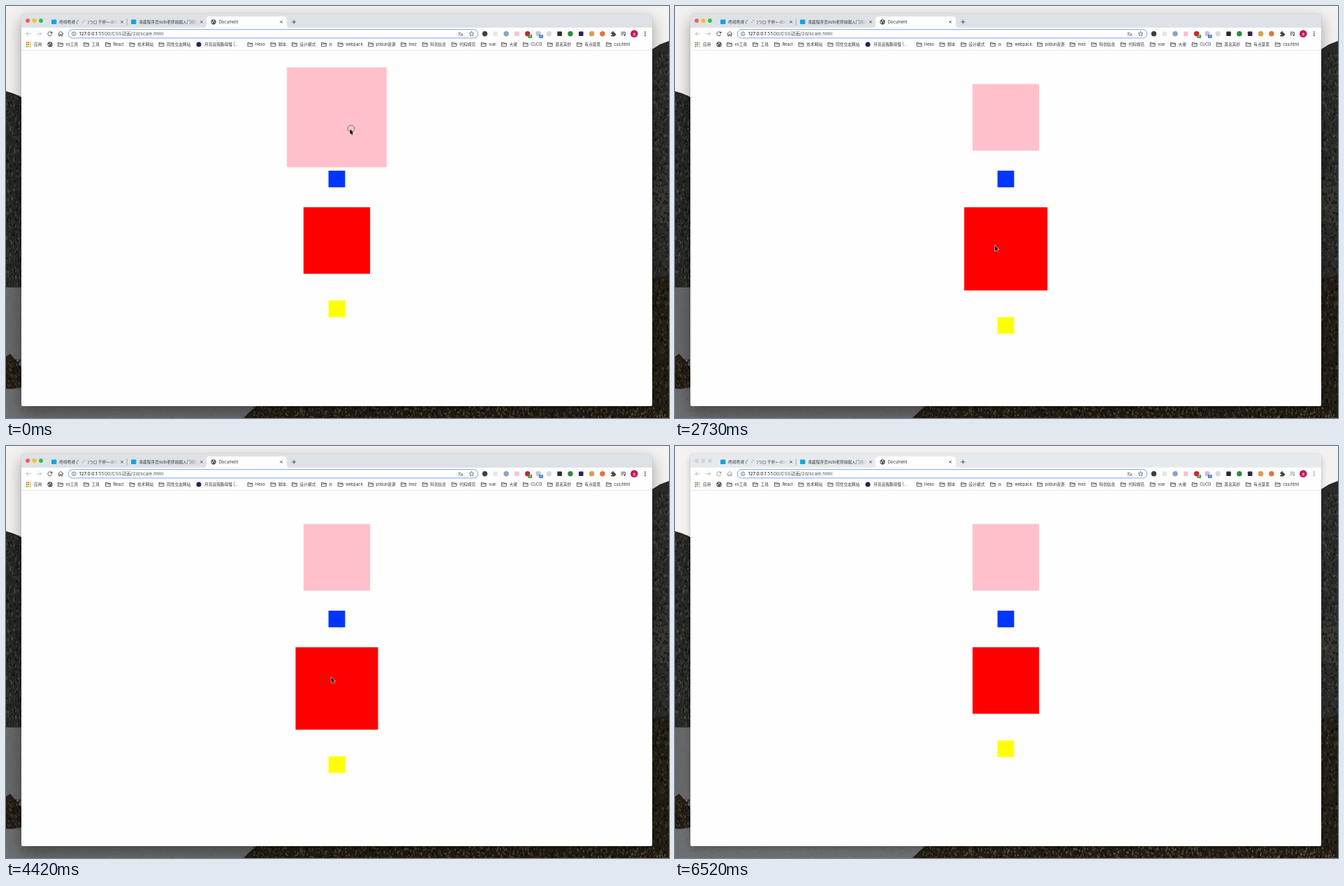
Write an HTML page with a canvas that moves like this. It is 949 px wide and 590 px high and loops after 6620 ms.

```html
<!DOCTYPE html>
<html lang="zh">
<head>
<meta charset="utf-8">
<title>Scale</title>
<style>
  html, body { margin: 0; width: 100%; height: 100%; overflow: hidden; background: #efedeb; }
  canvas, svg, .win { position: absolute; left: 0; top: 0; }
  .win {
    left: 22px; top: 11px; width: 903px; height: 562px;
    border-radius: 5px 5px 2px 2px; background: #fefefe;
    animation: shadow 6.62s step-end infinite;
  }
  text { font-family: Inter, "Noto Sans CJK SC", "Noto Sans CJK", sans-serif; font-size: 5.72px; fill: #2f3236; }
  .line { fill: none; stroke: #44474b; stroke-width: .9; }
  .strip, .light, .dim, .ring { animation: 6.62s step-end infinite; }
  .strip { fill: #dee1e6; animation-name: strip; }
  .light { animation-name: light; }
  .dim { animation-name: dim; }
  .ring { fill: none; stroke: #4a4044; stroke-width: .7; animation-name: ring; }
  .zoom, .grow, .push { animation: 6.62s ease infinite; transform-box: fill-box; }
  .zoom { transform-origin: center; animation-name: zoom; }
  .grow { transform-origin: top; animation-name: grow; }
  .push { animation-name: push; }
  .cursor { animation: move 6.62s linear infinite; }

  @keyframes shadow {
    0% { box-shadow: 0 0 1px rgba(0,0,0,.4), 0 9px 22px rgba(0,0,0,.36); }
    98.49%, to { box-shadow: 0 0 1px rgba(0,0,0,.3), 0 4px 9px rgba(0,0,0,.22); }
  }
  @keyframes strip { 98.49%, to { fill: #e7eaed; } }
  @keyframes light { 98.49%, to { fill: #d0d3d7; } }
  @keyframes dim { 98.49%, to { opacity: .55; } }
  @keyframes ring { 0% { opacity: 1; } 1.36%, to { opacity: 0; } }
  @keyframes zoom {
    0%, 7.55% { transform: scale(1.5); }
    22.66%, to { transform: scale(1); }
  }
  @keyframes grow {
    0%, 22.81% { transform: scale(1); }
    37.92% { transform: scale(1.25); }
    43.43% { transform: scale(1.25); animation-timing-function: cubic-bezier(.277,.093,.299,.873); }
    55.97% { transform: scale(1.0043); }
    70.77%, 71.83% { transform: scale(1.25); }
    86.93%, to { transform: scale(1); }
  }
  @keyframes push {
    0%, 22.81% { transform: translateY(0); }
    37.92% { transform: translateY(23.8px); }
    43.43% { transform: translateY(23.8px); animation-timing-function: cubic-bezier(.277,.093,.299,.873); }
    55.97% { transform: translateY(.4px); }
    70.77%, 71.83% { transform: translateY(23.8px); }
    86.93%, to { transform: translateY(0); }
  }
  @keyframes move {
    0%, 5.3% { transform: translate(492.4px,176.3px); }
    7.55% { transform: translate(503px,231px); }
    11% { transform: translate(518px,264px); }
    15.71% { transform: translate(525.1px,277.6px); }
    17.8% { transform: translate(528px,281px); }
    22.81% { transform: translate(516px,288.5px); }
    26.13% { transform: translate(491.4px,319px); }
    31% { transform: translate(468px,340px); }
    37%, 41.24% { transform: translate(457.4px,343px); }
    43.43% { transform: translate(533px,345px); }
    47.28% { transform: translate(640px,349px); }
    49% { transform: translate(643.5px,350px); }
    52.1% { transform: translate(615px,344px); }
    55.97% { transform: translate(521.5px,335px); }
    59.67% { transform: translate(466.6px,326.6px); }
    64% { transform: translate(459px,329px); }
    68.58% { transform: translate(470px,333px); }
    71.83% { transform: translate(533px,350px); }
    75.68% { transform: translate(688.3px,393.6px); }
    79.15% { transform: translate(874px,503px); }
    83% { transform: translate(915px,556px); }
    86.4%, to { transform: translate(923px,593px); }
  }
</style>
</head>
<body>
<canvas id="wall" width="949" height="590"></canvas>
<div class="win"></div>
<svg width="949" height="590" viewBox="0 0 949 590">
  <defs>
    <linearGradient id="fade" gradientUnits="userSpaceOnUse" x1="70" x2="84">
      <stop stop-color="#34373b"/><stop offset="1" stop-color="#34373b" stop-opacity="0"/>
    </linearGradient>
    <g id="folder" fill="none" stroke="#4f5357" stroke-width=".9">
      <path d="M.5 -2.6H3.1L4 -1.7H7.4V2.8H.5ZM.5 -.6H7.4"/>
    </g>
    <g id="globe">
      <circle r="3.6" fill="#44474b"/>
      <path d="M-2.6 -1L-.8 .2L-1 2.4L-2.4 1.2ZM-.4 -2.6L1.6 -2L.6 -.4L-.8 -.8ZM1 .6L2.6 .2L1.6 2.2Z" fill="#fff"/>
    </g>
    <path id="x" class="line" d="M-1.7 -1.7L1.7 1.7M1.7 -1.7L-1.7 1.7"/>
  </defs>

  <path class="strip" d="M22 31V16Q22 11 27 11H920Q925 11 925 16V31Z"/>
  <circle class="light" cx="31" cy="21" r="2.9" fill="#ff5850"/>
  <circle class="light" cx="40.5" cy="21" r="2.9" fill="#fdb924"/>
  <circle class="light" cx="50" cy="21" r="2.9" fill="#28c33c"/>
  <path d="M283 31Q287 31 287 27V19Q287 15 291 15H398Q402 15 402 19V27Q402 31 406 31Z" fill="#fefefe"/>

  <rect x="65" y="19.5" width="7.4" height="6.6" rx="1" fill="#14a4d8"/>
  <g transform="translate(76.3 24.9)"><text style="fill:url(#fade)">咚呀咚呀 (゜-゜)つロ 干杯~-dong</text></g>
  <use href="#x" x="166" y="22.8"/>
  <path class="line" d="M173.3 18V27.5" style="stroke:#8b8f94;stroke-width:.6"/>
  <rect x="179" y="19.5" width="7.4" height="6.6" rx="1" fill="#14a4d8"/>
  <g transform="translate(190.4 24.9)"><text style="fill:url(#fade)">青鹿程序员sulo老师前端入门视频</text></g>
  <use href="#x" x="280" y="22.8"/>
  <use href="#globe" x="297" y="22.8"/>
  <text x="304.7" y="24.9">Document</text>
  <use href="#x" x="394" y="22.8"/>
  <path class="line" d="M409.2 22.8H415.2M412.2 19.8V25.8"/>

  <path class="line" d="M35.7 39.8H29.2M32.2 36.7L29.1 39.8L32.2 42.9M44 39.8H50.5M47.5 36.7L50.6 39.8L47.5 42.9" style="stroke:#b4b6b9"/>
  <g class="dim">
    <path class="line" d="M65.3 38A3 3 0 1 0 65.8 40.6"/>
    <path d="M66.3 36.2V39.3H63.2Z" fill="#44474b"/>
    <path class="line" d="M74.5 40L78.3 36.4L82.1 40M75.7 39.2V43H77.4V40.6H79.2V43H80.9V39.2"/>
    <path class="line" d="M880.3 37.5H886.3M880.3 39.5H885M880.3 41.5H883M886.3 37.5V41.8"/>
    <circle cx="885.4" cy="41.9" r="1.1" fill="#44474b"/>
    <circle cx="914.8" cy="37.2" r=".8"/><circle cx="914.8" cy="39.8" r=".8"/><circle cx="914.8" cy="42.4" r=".8"/>
  </g>
  <rect x="89.3" y="33.7" width="586.4" height="12.2" rx="6.1" fill="#fff" stroke="#7fa2ec" stroke-width="1"/>
  <circle class="line" cx="97.3" cy="39.8" r="2.8" style="stroke-width:.7"/>
  <path class="line" d="M97.3 39.3V41.4M97.3 38V38.7" style="stroke-width:.8"/>
  <text x="104.7" y="42.1" style="font-size:6.82px;fill:#4d5155"><tspan fill="#15171a">127.0.0.1</tspan>:5500/CSS动画/2d/scale.html</text>
  <text x="647" y="40.8" style="font-size:4.6px">文</text>
  <text x="650.9" y="43.2" style="font-size:5px">A</text>
  <path class="line" d="M666.5 36.4L667.5 38.7L669.9 38.9L668 40.5L668.6 42.9L666.5 41.6L664.4 42.9L665 40.5L663.1 38.9L665.5 38.7Z" style="stroke-width:.7"/>
  <g id="tools"></g>
  <rect x="747.3" y="40.9" width="5.6" height="5" rx="1" fill="#3d9445"/>
  <rect x="763" y="40.9" width="5.6" height="5" rx="1" fill="#3f73d8"/>
  <text x="748.8" y="45" style="font-size:4.4px;fill:#fff">2</text>
  <text x="764.4" y="45" style="font-size:4.4px;fill:#fff">6</text>
  <path d="M866 38H867.6A1.3 1.3 0 1 1 870 38H871.6V39.5A1.3 1.3 0 1 1 871.6 42V43.4H866V41.8A1.2 1.2 0 1 0 866 39.5Z" fill="#45484c"/>
  <circle cx="899.2" cy="39.8" r="5.3" fill="#c2185b"/>
  <text x="899.2" y="41.5" text-anchor="middle" style="font-size:4.6px;fill:#fff">木</text>

  <g id="marks"></g>
  <text x="40" y="57">应用</text>
  <use href="#globe" x="63" y="54.9"/>
  <circle cx="276" cy="54.9" r="3.5" fill="#27264f"/>
  <text x="284" y="57">月亮说我跑得慢 |…</text>
  <path d="M22 63.6H925" stroke="#dfe1e4" stroke-width=".8"/>

  <rect class="zoom" x="425.85" y="111.75" width="95.3" height="95.3" fill="#ffc0cb"/>
  <rect x="461.6" y="235.8" width="23.8" height="23.8" fill="#0035ff"/>
  <rect class="grow" x="425.85" y="288.2" width="95.3" height="95.3" fill="#f00"/>
  <rect class="push" x="461.6" y="421.7" width="23.8" height="23.8" fill="#ff0"/>

  <circle class="ring" cx="494" cy="175.6" r="4.8"/>
  <path class="cursor" d="M0 0V7.4L1.7 5.9L2.8 8.4L4.1 7.9L3 5.3H5.2Z" fill="#000" stroke="#fff" stroke-width="1.1" paint-order="stroke"/>
</svg>
<script>
  const NS = 'http://www.w3.org/2000/svg';
  function add(parent, tag, attrs, text) {
    const el = document.createElementNS(NS, tag);
    for (const k in attrs) el.setAttribute(k, attrs[k]);
    if (text) el.textContent = text;
    document.getElementById(parent).append(el);
  }

  // Bookmark bar: folder position and label
  const folders = [
    [74, 'vs工具'], [111, '工具'], [142, 'React'], [176.5, '技术网站'], [218.5, '同性交友网站'],
    [345.5, 'Hexo'], [378.5, '脚本'], [409, '设计模式'], [451, 'js'], [474.7, 'webpack'],
    [518.2, 'pildun资源'], [565, 'mez'], [595.7, '科创信息'], [637.5, '代码规范'], [679.7, 'vue'],
    [709, '大佬'], [739.7, 'CI/CD'], [774.7, '莫名其妙'], [816.7, '有点意思'], [858.7, 'css/html']
  ];
  for (const [x, label] of folders) {
    add('marks', 'use', { href: '#folder', x, y: 54.9 });
    add('marks', 'text', { x: x + 11.5, y: 57 }, label);
  }
  const dots = ['#e94335', '#e94335', '#f3b51d', '#34a853', '#4285f4', '#f3b51d', '#34a853', '#f3b51d', '#f3b51d'];
  dots.forEach((fill, i) => add('marks', 'rect', {
    x: 28.7 + i % 3 * 2.7, y: 51.6 + Math.floor(i / 3) * 2.7, width: 1.8, height: 1.8, fill
  }));

  // Toolbar buttons, 15.3 px apart; true = round
  const tools = [
    ['#3c4043', true], ['#e8e8e8'], ['#86a3cc', true], ['#f7c3d0'], ['#d0242c', true], ['#c3c6cb', true],
    ['#d9d9d9', true], ['#2b2b2b'], ['#2f8a35', true], ['#2c2450'], ['#e29a45', true], ['#e8703e', true]
  ];
  tools.forEach(([fill, round], i) => {
    const s = round ? 7.4 : 6.6;
    add('tools', 'rect', { x: 685.4 + i * 15.3 - s / 2, y: 39.8 - s / 2, width: s, height: s, rx: round ? s / 2 : 1, fill });
  });

  // Mountain lake behind the window
  const g = document.getElementById('wall').getContext('2d');
  let seed = 7;
  const rnd = () => (seed = seed * 16807 % 2147483647) / 2147483647;
  function shape(fill, ...pts) {
    g.fillStyle = fill;
    g.beginPath();
    for (let i = 0; i < pts.length; i += 2) g.lineTo(pts[i], pts[i + 1]);
    g.fill();
  }
  function specks(x, y, w, h, n, colors, tall) {
    for (let i = 0; i < n; i++) {
      g.fillStyle = colors[Math.floor(rnd() * colors.length)];
      g.fillRect(x + rnd() * w, y + rnd() * h, .8 + rnd() * 1.4, 1 + rnd() * tall);
    }
  }
  shape('#f4f2f0', 0, 0, 949, 0, 949, 590, 0, 590);
  shape('#272725', 0, 122, 10, 125, 26, 132, 26, 404, 0, 404);
  specks(0, 128, 24, 274, 620, ['#141413', '#383835', '#1b1b19', '#474743'], 4);
  shape('#666768', 0, 403, 26, 403, 26, 590, 0, 590);
  specks(0, 404, 22, 100, 60, ['#5d5f60', '#6e7071'], 1);
  shape('#241f18', 0, 502, 6, 498, 12, 505, 22, 520, 22, 546, 0, 550);
  specks(0, 505, 20, 40, 120, ['#12100c', '#4a3c28', '#1b1712'], 3);
  shape('#6c6d6e', 0, 548, 360, 570, 360, 590, 0, 590);
  specks(0, 552, 345, 38, 420, ['#626364', '#767778', '#68696a'], 1);
  shape('#2b2b29', 920, 65, 936, 55, 949, 50, 949, 590, 920, 590);
  specks(924, 66, 25, 200, 500, ['#181816', '#3b3b38', '#20201e', '#474744'], 4);
  shape('#383631', 920, 262, 949, 256, 949, 312, 920, 306);
  specks(924, 262, 25, 130, 280, ['#201f1c', '#45423b', '#161513'], 3);
  shape('#211e17', 920, 392, 949, 385, 949, 590, 920, 590);
  specks(924, 390, 25, 185, 460, ['#100f0c', '#453b28', '#2c271b'], 4);
  shape('#221e16', 340, 590, 350, 580, 360, 572, 949, 572, 949, 590);
  specks(352, 573, 597, 17, 1200, ['#0f0d0a', '#51452d', '#2e281b', '#655737'], 3);
</script>
</body>
</html>
```
